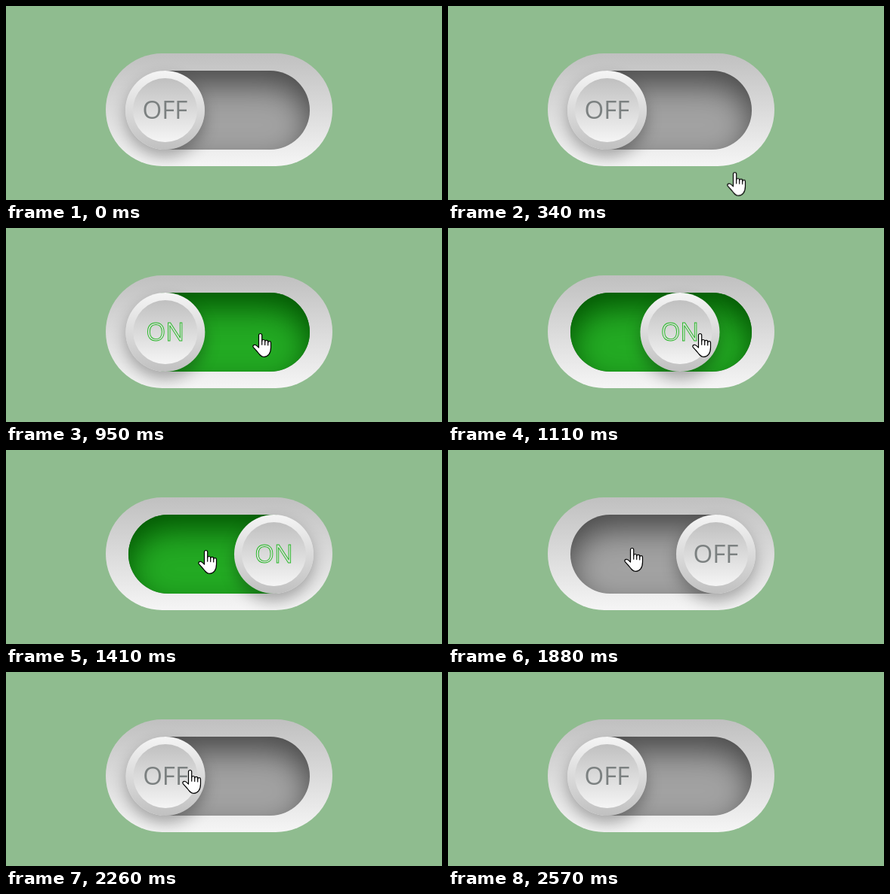
Recreate the animation shown at these times as an HTML page. Size 577 by 258 pixels, loop 3500 ms.

```html
<!DOCTYPE html>
<html lang="en">
<head>
<meta charset="utf-8">
<title>Toggle switch</title>
<style>
  html, body { margin: 0; width: 100%; height: 100%; overflow: hidden; }
  body { position: relative; background: #8fbc8f; }
  body *, .knob::before { position: absolute; box-sizing: border-box; }

  .frame {
    left: 132px; top: 63px; width: 300px; height: 150px;
    border-radius: 75px; overflow: hidden;
    background: linear-gradient(#c0c0c0, #f5f5f5);
  }
  .track {
    left: 30px; top: 23px; width: 240px; height: 105px; border-radius: 53px;
    background: #a2a2a2;
    box-shadow: inset 0 20px 40px rgba(0, 0, 0, .55);
  }
  .green {
    background: #23aa23;
    box-shadow: inset 0 20px 40px rgba(0, 80, 0, .95);
  }
  .knob {
    left: 26px; top: 23px; width: 105px; height: 105px; border-radius: 50%;
    background: linear-gradient(#f5f5f5, #c0c0c0);
    box-shadow: 0 10px 20px rgba(0, 0, 0, .3);
  }
  .knob::before {
    content: ""; inset: 10px; border-radius: 50%;
    background: linear-gradient(#c0c0c0, #f5f5f5);
  }
  .label {
    inset: 0; text-align: center; color: #7b8080;
    font: 33px/103px "Open Sans", "Noto Sans", sans-serif;
  }
  .on-label { color: #d5ddd5; -webkit-text-stroke: .9px #25b825; }
  .hand { left: 0; top: 0; overflow: visible; }

  .knob, .hand, .on, .off { animation: 3500ms infinite paused; }
  .knob { animation-name: slide; }
  .hand { animation-name: point; }
  .on { animation-name: show; }
  .off { animation-name: hide; }

  @keyframes slide {
    0%, 26.94% { transform: none; animation-timing-function: ease; }
    38.37%, 53.97% { transform: translateX(144px); animation-timing-function: ease; }
    65.4%, 100% { transform: none; }
  }
  @keyframes show {
    0% { visibility: hidden; animation-timing-function: step-end; }
    26.9% { visibility: visible; animation-timing-function: step-end; }
    51.2%, 100% { visibility: hidden; }
  }
  @keyframes hide {
    0% { visibility: visible; animation-timing-function: step-end; }
    26.9% { visibility: hidden; animation-timing-function: step-end; }
    51.2%, 100% { visibility: visible; }
  }
  @keyframes point {
    0% { transform: translate(600px, 300px); animation-timing-function: step-end; }
    9.37% { transform: translate(369px, 221px); animation-timing-function: ease-out; }
    18.18%, 29.2% { transform: translate(326px, 140px); animation-timing-function: linear; }
    31.4% { transform: translate(323px, 140px); animation-timing-function: ease-in-out; }
    40.22% { transform: translate(254px, 133px); animation-timing-function: ease-out; }
    44.6%, 64.5% { transform: translate(233px, 130px); animation-timing-function: ease-in; }
    71.05% { transform: translate(425px, 238px); animation-timing-function: step-end; }
    73.2%, 100% { transform: translate(600px, 300px); }
  }
</style>
</head>
<body>
  <div class="frame">
    <div class="track"></div>
    <div class="track green on"></div>
    <div class="knob">
      <span class="label off">OFF</span>
      <span class="label on-label on">ON</span>
    </div>
  </div>
  <svg class="hand" width="26" height="33" fill="#fff" stroke="#000" stroke-width="1.2" stroke-linejoin="round" stroke-linecap="round">
    <path d="M8.5 19V2.6a2.1 2.1 0 0 1 4.2 0V10.4a2 1.9 0 0 1 4 0V11.2a2 1.8 0 0 1 4 0V12.4a1.9 1.8 0 0 1 3.8 0V19C24.5 27 20.5 31.3 15.5 31.3C11.5 31.3 9.5 28.5 7 25L1.3 18.6Q.1 16.6 2 15.6Q4 14.8 6.2 16.9Z"/>
    <path fill="none" d="M12.7 10.4v4.8M16.7 11.2v4.4M20.7 12.4v3.6"/>
  </svg>
<script>
  const LOOP = 3500, TICK = 77.1, OFFSET = 20;
  const parts = document.getAnimations();

  // Motion advances in short even ticks, about 13 per second.
  function draw() {
    const t = performance.now() % LOOP;
    const held = Math.max(0, Math.floor((t - OFFSET) / TICK) * TICK + OFFSET);
    for (const part of parts) part.currentTime = held;
    requestAnimationFrame(draw);
  }
  draw();
</script>
</body>
</html>
```
